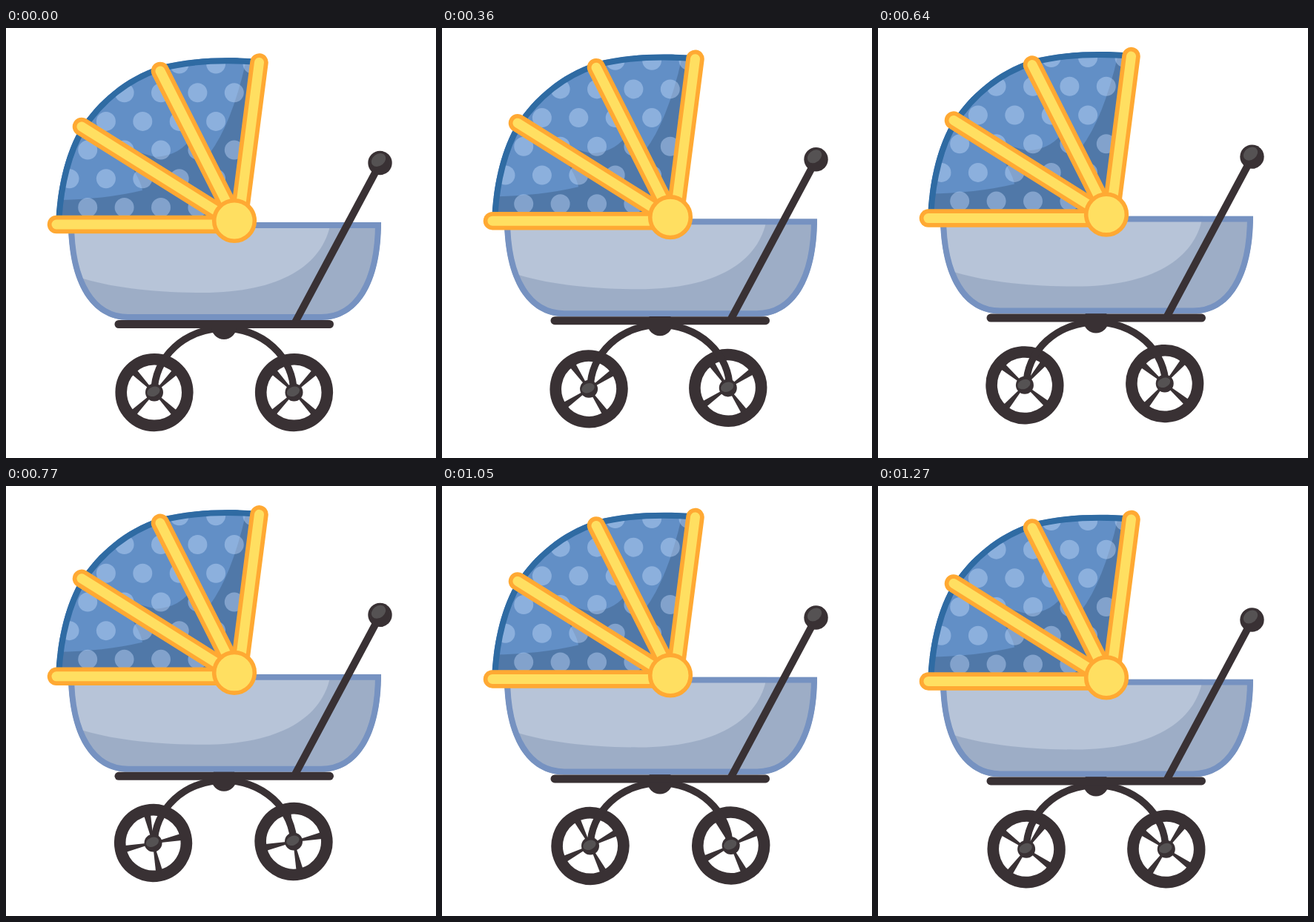
An HTML page for the animation above (1310 ms loop, 580 by 580 pixels).

```html
<!DOCTYPE html>
<html lang="en">
<head>
<meta charset="utf-8">
<title>Baby carriage</title>
<style>
  html, body { margin: 0; width: 100%; height: 100%; overflow: hidden; background: #fff; }
  svg { display: block; width: 100vw; height: 100vh; }
</style>
</head>
<body>
<svg viewBox="0 0 580 580" xmlns="http://www.w3.org/2000/svg">
  <defs>
    <path id="rim" d="M67.500 258C70 210 82 165 100 135C124 98 160 67 207 51C245 41 290 38 342 42"/>
    <path id="hood" d="M67.500 258C70 210 82 165 100 135C124 98 160 67 207 51C245 41 290 38 342 42L315 260L308 266H67Z"/>
    <path id="tub" d="M84 262H506C506 345 475 394 425 394H165C115 394 84 345 84 262Z"/>
    <clipPath id="hoodClip"><use href="#hood"/></clipPath>
    <clipPath id="tubClip"><use href="#tub"/></clipPath>
    <g id="wheel" fill="#393134">
      <circle r="44.800" fill="none" stroke="#393134" stroke-width="15.600"/>
    </g>
    <g id="axle">
      <circle r="12" fill="#393134"/>
      <ellipse cx="-0.500" cy="-1.500" rx="9" ry="6.300" transform="rotate(-22)" fill="#555253"/>
    </g>
  </defs>

  <g id="left"><g class="spin"><use href="#wheel"/></g></g>
  <g id="right"><g class="spin"><use href="#wheel"/></g></g>

  <g id="body">
    <path d="M200 491A94 86 0 0 1 388 491" fill="none" stroke="#393134" stroke-width="9.500"/>
    <circle cx="294" cy="403" r="17" fill="#393134"/>

    <g clip-path="url(#tubClip)">
      <use href="#tub" fill="#9dadc6"/>
      <path d="M80 262H438C428 320 370 357 265 357C200 357 140 350 98 336Z" fill="#b7c4d8"/>
      <use href="#tub" fill="none" stroke="#7692c1" stroke-width="16"/>
    </g>
    <path d="M152 399.500H436.500" stroke="#393134" stroke-width="11" stroke-linecap="round"/>
    <path d="M505 182L390 397" stroke="#393134" stroke-width="10"/>
    <circle cx="504.500" cy="182" r="16.200" fill="#393134"/>
    <ellipse cx="502.500" cy="178" rx="10.500" ry="8" transform="rotate(-38 502.500 178)" fill="#555253"/>

    <g clip-path="url(#hoodClip)">
      <use href="#hood" fill="#5078a8"/>
      <g fill="#628fc6">
        <path d="M60 232Q130 232 184 219Q182 206 165 180L100 133L60 150Z"/>
        <path d="M100 133Q165 166 202 174Q236 172 252 145L208 57L150 30L80 90Z"/>
        <path d="M208 57L262 168L274 170Q304 130 323 48L300 30Z"/>
      </g>
      <g id="dots" fill="#c4dbfa" fill-opacity=".43"></g>
      <use href="#rim" fill="none" stroke="#2f6ba3" stroke-width="16"/>
    </g>
    <g id="bars" stroke-linecap="round"></g>
    <circle cx="308" cy="260" r="27.300" fill="#ffdf61" stroke="#ffa933" stroke-width="5.600"/>
  </g>

  <use id="leftAxle" href="#axle"/>
  <use id="rightAxle" href="#axle"/>
</svg>
<script>
const $ = id => document.getElementById(id);
const NS = "http://www.w3.org/2000/svg";

function add(parent, tag, attrs) {
  const el = document.createElementNS(NS, tag);
  for (const key in attrs) el.setAttribute(key, attrs[key]);
  parent.appendChild(el);
}

// Polka dots: staggered rows
for (let row = 0; row < 6; row++) {
  for (let col = 0; col < 6; col++) {
    add($("dots"), "circle", {
      cx: 85.5 + 49.4 * col + (row % 2 ? 0 : 24.7),
      cy: 242 - 38.7 * row,
      r: 13
    });
  }
}

// Hood ribs: orange edge, yellow core
const ribs = [[341.5, 46.5, 314, 260], [208, 58, 310, 260], [102, 133, 308, 262], [68, 265, 300, 265]];
for (const [x1, y1, x2, y2] of ribs) {
  add($("bars"), "line", { x1, y1, x2, y2, stroke: "#ffa933", "stroke-width": 24.5 });
  add($("bars"), "line", { x1, y1, x2, y2, stroke: "#ffdf61", "stroke-width": 13 });
}

// Spokes widen toward the tyre
for (let a = 0; a < 360; a += 90) {
  add($("wheel"), "path", { d: "M8 -1.5L38 -4.5V4.5L8 1.5Z", transform: `rotate(${a})` });
}

const LOOP = 1310, RATE = 0.022, TURN = 12.5;
const wheels = [
  { id: "left", x: 199, y: 490.8, r: 1.25, phase: 36 },
  { id: "right", x: 387.7, y: 489.7, r: 2, phase: 66 }
];
const spinners = document.querySelectorAll(".spin");

function draw(time) {
  const t = Math.floor((time % LOOP) / 10) * 10;
  const step = Math.floor((t + 5) * RATE);
  const lift = -0.6 * Math.min(step, 30.6 - step);
  const angle = TURN * step;

  $("body").setAttribute("transform", `translate(0 ${lift})`);
  for (const w of wheels) {
    const a = (w.phase + angle) * Math.PI / 180;
    const move = `translate(${w.x + w.r * Math.cos(a)} ${w.y + lift + w.r * Math.sin(a)})`;
    $(w.id).setAttribute("transform", move);
    $(w.id + "Axle").setAttribute("transform", move);
  }
  for (const s of spinners) s.setAttribute("transform", `rotate(${45.5 + angle})`);
}

function tick() {
  draw(performance.now());
  requestAnimationFrame(tick);
}
tick();
</script>
</body>
</html>
```
